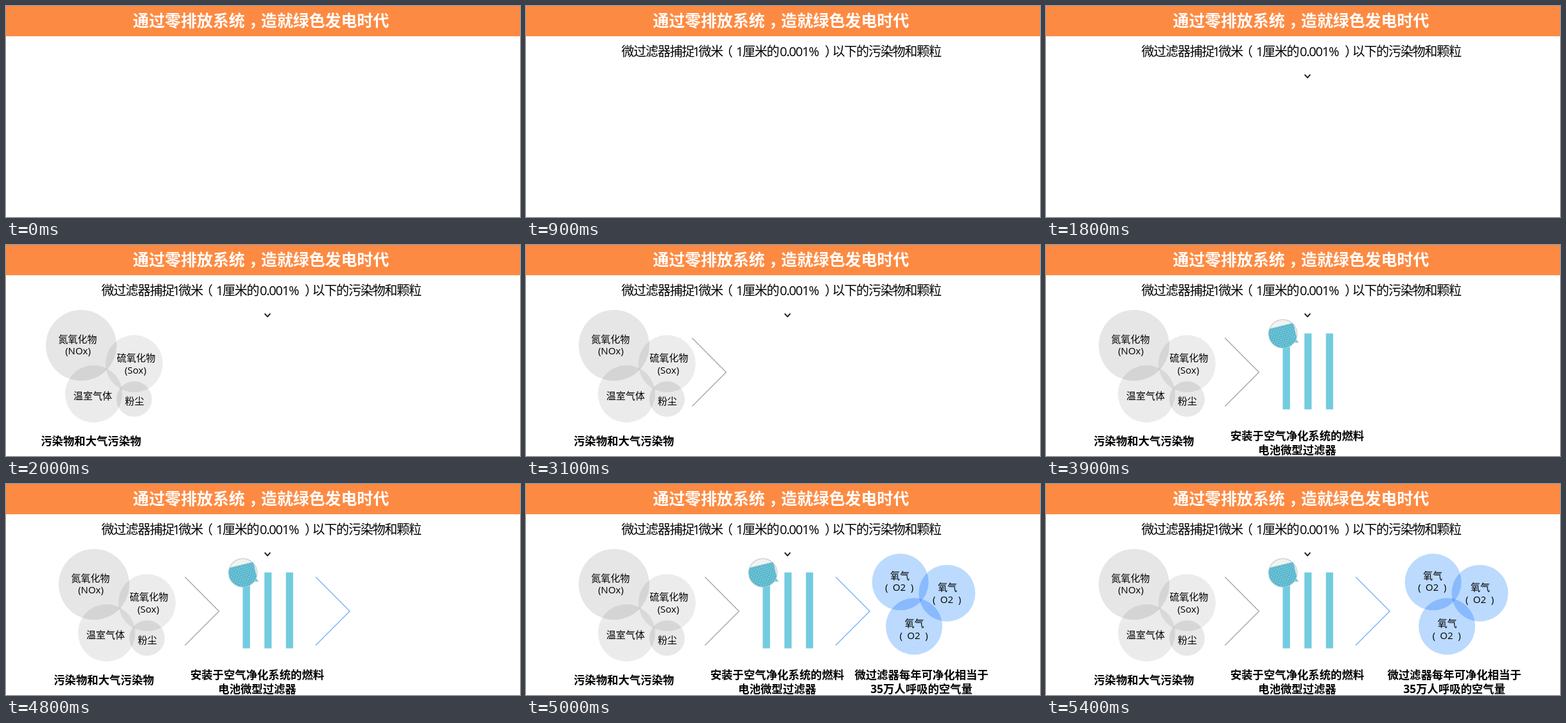
An HTML page with a canvas that plays this animation: 800 px wide and 328 px high, repeating every 8000 ms.

```html
<!DOCTYPE html>
<html lang="zh-CN">
<head>
<meta charset="utf-8">
<title>零排放系统</title>
<style>
  html, body { margin: 0; width: 100%; height: 100%; overflow: hidden; background: #fff; }
  canvas { display: block; width: 800px; height: 328px; }
</style>
</head>
<body>
<canvas id="stage"></canvas>
<script>
const W = 800, H = 328, LOOP = 8000;
const FONT = '"Open Sans", "Noto Sans CJK SC", "Noto Sans CJK", sans-serif';
const TEAL = '#72ccdf';
const canvas = document.getElementById('stage');
const ctx = canvas.getContext('2d');
const ratio = window.devicePixelRatio || 1;
canvas.width = W * ratio;
canvas.height = H * ratio;

// y is the middle of the glyphs
function text(str, x, y, size, { bold = false, align = 'center', color = '#000', track = 0 } = {}) {
  ctx.font = `${bold ? 700 : 400} ${size}px ${FONT}`;
  ctx.letterSpacing = `${track}px`;
  ctx.textAlign = align;
  ctx.textBaseline = 'alphabetic';
  ctx.fillStyle = color;
  ctx.fillText(str, x, y + size * 0.355);
}

function pieces(list, y, size, style) {
  for (const [str, x] of list) text(str, x, y, size, { ...style, align: 'left' });
}

function disc(x, y, r, color) {
  ctx.fillStyle = color;
  ctx.beginPath();
  ctx.arc(x, y, r, 0, Math.PI * 2);
  ctx.fill();
}

function blend(discs) {
  ctx.save();
  ctx.globalCompositeOperation = 'multiply';
  for (const d of discs) disc(...d);
  ctx.restore();
}

function polyline(points, color, width) {
  ctx.strokeStyle = color;
  ctx.lineWidth = width;
  ctx.beginPath();
  for (const [x, y] of points) ctx.lineTo(x, y);
  ctx.stroke();
}

function caption(lines, x, y) {
  lines.forEach((line, i) => text(line, x, y + i * 22, 17.35, { bold: true }));
}

function arrow(x, color) {
  polyline([[x, 144.5], [x + 53, 197.7], [x, 250.7]], color, 1.4);
}

function title() {
  ctx.fillStyle = '#fd8a42';
  ctx.fillRect(0, 0, W, 47);
  pieces([['通过零排放系统', 197.5], ['，', 378], ['造就绿色发电时代', 397]],
    23, 24.9, { bold: true, color: '#fff' });
}

function subtitle() {
  pieces([
    ['微过滤器捕捉', 148.5], ['1', 259.5], ['微米', 268.5], ['（', 302], ['1', 327],
    ['厘米的', 337], ['0.001%', 395], ['）', 465], ['以下的污染物和颗粒', 476.5]
  ], 71, 20, { track: -1.2 });
}

function chevron() {
  polyline([[402.6, 106.6], [407, 111.4], [411.4, 106.6]], '#111', 1.7);
}

function pollutants() {
  blend([
    [137, 156, 55, '#e6e6e6'],
    [219.5, 184.5, 44.5, '#ececec'],
    [156.5, 231.5, 44.5, '#ebebeb'],
    [219.5, 239.5, 27.5, '#e8e8e8']
  ]);
  text('氮氧化物', 131.5, 146.5, 15);
  text('(NOx)', 132, 165, 15);
  text('硫氧化物', 222.5, 176, 15);
  text('(Sox)', 221.5, 194.5, 15);
  text('温室气体', 155, 234.5, 15);
  text('粉尘', 220, 243, 15);
  caption(['污染物和大气污染物'], 152.3, 304.5);
}

function mesh() {
  ctx.save();
  ctx.beginPath();
  ctx.arc(368.7, 138, 22, 0, Math.PI * 2);
  ctx.clip();
  ctx.beginPath();
  for (const [x, y] of [[345, 131], [385, 121], [394, 162], [345, 162]]) ctx.lineTo(x, y);
  ctx.clip();
  ctx.fillStyle = '#56b5cb';
  ctx.fillRect(340, 115, 60, 50);
  ctx.translate(368, 140);
  ctx.rotate(-0.245);
  ctx.fillStyle = '#7ccadb';
  for (let row = -6; row <= 8; row++) {
    for (let col = -7; col <= 7; col++) {
      ctx.beginPath();
      ctx.ellipse(col * 4.4 + (row & 1) * 2.2, row * 3.3, 1.6, 1.05, 0, 0, Math.PI * 2);
      ctx.fill();
    }
  }
  ctx.restore();
}

function filter() {
  ctx.fillStyle = TEAL;
  ctx.fillRect(368.5, 140, 11.3, 115.5);
  ctx.fillRect(402.2, 137.5, 11.2, 118);
  ctx.fillRect(435.7, 137.5, 11.2, 118);

  ctx.beginPath();
  ctx.moveTo(388, 143);
  ctx.quadraticCurveTo(390, 149, 394, 151.5);
  ctx.quadraticCurveTo(388, 152, 383, 151);
  ctx.fill();
  disc(368.7, 138, 22.8, '#c9cfd0');
  disc(368.7, 138, 21.4, '#f2f2f2');
  mesh();
  caption(['安装于空气净化系统的燃料', '电池微型过滤器'], 391, 296.5);
}

function oxygen() {
  const spots = [[602.5, 152.3, 602], [675.3, 169.7, 676], [624, 221.3, 624.5]];
  const labels = [142.5, 161, 217];
  blend(spots.map(([x, y]) => [x, y, 44, '#bbdafe']));
  spots.forEach(([, , x], i) => {
    text('氧气', x, labels[i], 15);
    text('(\u2002O2\u2002)', x - 1, labels[i] + 18.5, 15);
  });
  caption(['微过滤器每年可净化相当于', '35万人呼吸的空气量'], 635.5, 296.5);
}

// Each part appears offset, then snaps to its place
const parts = [
  { show: 500, settle: 900, dx: 0, dy: -10, draw: subtitle },
  { show: 1600, settle: 1800, dx: 0, dy: -20, draw: chevron },
  { show: 2000, settle: 2400, dx: -20, dy: 0, draw: pollutants },
  { show: 3100, settle: 3300, dx: -20, dy: 0, draw: () => arrow(278.5, '#a8a8a8') },
  { show: 3500, settle: 3900, dx: -20, dy: 0, draw: filter },
  { show: 4600, settle: 4800, dx: -20, dy: 0, draw: () => arrow(482, '#78b3fb') },
  { show: 5000, settle: 5400, dx: -20, dy: 0, draw: oxygen }
];

const start = performance.now();

function frame() {
  const t = (performance.now() - start) % LOOP;
  ctx.setTransform(ratio, 0, 0, ratio, 0, 0);
  ctx.fillStyle = '#fff';
  ctx.fillRect(0, 0, W, H);
  title();
  for (const { show, settle, dx, dy, draw } of parts) {
    if (t < show) continue;
    ctx.save();
    if (t < settle) ctx.translate(dx, dy);
    draw();
    ctx.restore();
  }
  requestAnimationFrame(frame);
}
frame();
</script>
</body>
</html>
```
